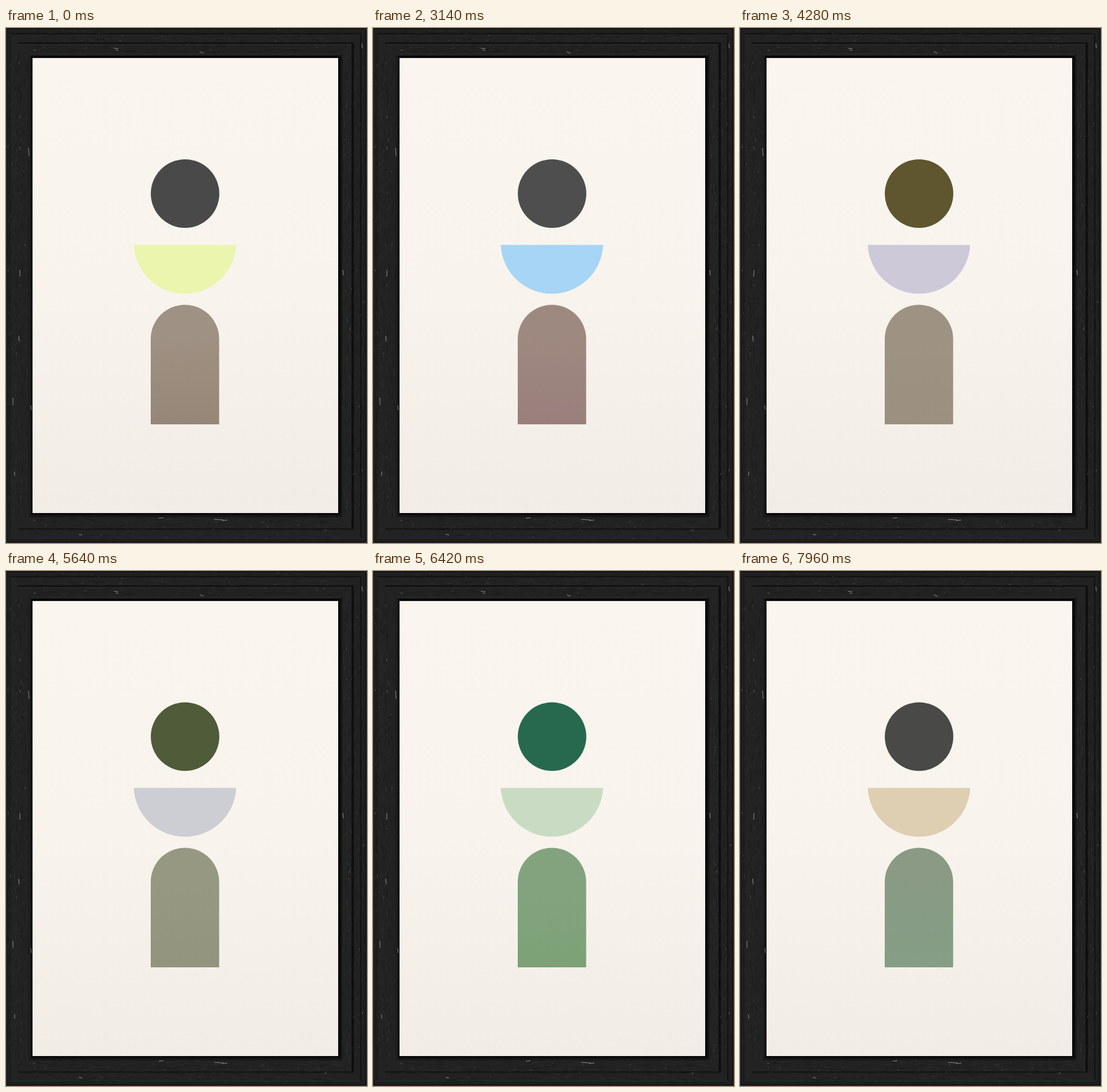
Write an HTML page that moves like this. It is 626x894 px and loops after 8 s.

```html
<!DOCTYPE html>
<html lang="en">
<head>
<meta charset="utf-8">
<title>Framed shapes</title>
<style>
  html, body { margin: 0; width: 100%; height: 100%; overflow: hidden; background: #555; }
  svg { display: block; width: 100vw; height: 100vh; }
</style>
</head>
<body>
<svg id="stage" viewBox="0 0 626 894">
  <defs>
    <linearGradient id="paper" x1="0" y1="0" x2="0" y2="1">
      <stop offset="0" stop-color="#faf6ef"/>
      <stop offset=".5" stop-color="#f8f4ed"/>
      <stop offset="1" stop-color="#f1ece6"/>
    </linearGradient>
    <linearGradient id="archFill" x1="0" y1="0" x2="0" y2="1">
      <stop id="archTop" offset=".25"/>
      <stop id="archBottom" offset="1"/>
    </linearGradient>
  </defs>
  <g id="frame"></g>
  <rect x="46" y="52" width="530" height="790" fill="url(#paper)"/>
  <path d="M46 52.5H576" stroke="#c9c5bf" opacity=".6"/>
  <circle id="disc" cx="310.5" cy="287.5" r="59.4"/>
  <path id="bowl" d="M221.4 376.5H399.2A89 89 0 0 1 221.4 376.5Z"/>
  <path d="M251 688V539.8A59.3 59.3 0 0 1 369.6 539.8V688Z" fill="url(#archFill)"/>
</svg>
<script>
const W = 626, H = 894;
const byId = id => document.getElementById(id);
const frame = byId('frame');

function add(tag, attrs) {
  const node = document.createElementNS('http://www.w3.org/2000/svg', tag);
  for (const key in attrs) node.setAttribute(key, attrs[key]);
  frame.append(node);
}

let seed = 7;
function random() {
  seed = (seed * 16807) % 2147483647;
  return seed / 2147483647;
}
const between = (a, b) => a + (b - a) * random();

// Insets of each moulding edge: top, right, bottom, left
const edges = [
  [0, .5, .5, .5], [2, 4, 3, 2], [9, 10, 8, 7], [11, 12, 10, 9], [25, 23, 23, 20],
  [28, 27, 26, 22], [30, 29, 28, 24], [43, 43, 45, 39], [48, 46, 49, 43], [52, 50, 52, 46]
];
// Grey levels of each moulding: top, right, bottom, left
const greys = [
  [20, 24, 22, 28], [32, 32, 30, 30], [18, 20, 38, 32], [34, 33, 34, 35], [18, 15, 22, 34],
  [42, 38, 36, 36], [33, 35, 34, 34], [36, 22, 22, 30], [8, 8, 9, 13]
];

const corners = ([t, r, b, l]) => [[l, t], [W - r, t], [W - r, H - b], [l, H - b]];

greys.forEach((levels, i) => {
  const outer = corners(edges[i]), inner = corners(edges[i + 1]);
  levels.forEach((v, side) => {
    const next = (side + 1) % 4;
    const fill = `rgb(${v},${v},${v})`;
    add('polygon', {
      points: [outer[side], outer[next], inner[next], inner[side]].join(' '),
      fill, stroke: fill, 'stroke-width': .3
    });
  });
});

// Fine strokes following the wood on all four sides
function grain(count, maxLength, stroke, width, opacity) {
  let d = '';
  for (let i = 0; i < count; i++) {
    const length = between(1, maxLength);
    const pick = random();
    const far = random() < .5;
    if (pick < .62) {
      const x = far ? between(584, 622) : between(3, 40);
      d += `M${x.toFixed(1)} ${between(45, 840).toFixed(1)}l${between(-.5, .5).toFixed(1)} ${length.toFixed(1)}`;
    } else {
      const y = far ? between(849, 889) : between(3, 43);
      d += `M${between(40, 575).toFixed(1)} ${y.toFixed(1)}l${length.toFixed(1)} ${between(-.5, .5).toFixed(1)}`;
    }
  }
  add('path', { d, stroke, 'stroke-width': width, opacity, fill: 'none' });
}
grain(900, 16, '#000', .7, .25);
grain(900, 10, '#666', .6, .22);
grain(90, 5, '#bbb', .6, .35);
grain(20, 5, '#eee', .6, .5);

// The larger chips in the paint
add('path', {
  d: 'M187 35l8 1M190 38l5 1M336 41l6 3M39 208l1 14M24 420v11M22 534l1 10M12 642v13' +
     'M265 851l8 -1M361 853l16 1M375 855l9 -1M126 879l6 1M617 27l1 8M584 420l1 9M43 655l1 8M15 770v7',
  stroke: '#ccc', 'stroke-width': .9, opacity: .7, fill: 'none'
});

// Colours: disc, bowl, top of arch, bottom of arch
const palettes = [
  ['#494949', '#ebf5ae', '#9f9183', '#968677'],
  ['#4e4e4e', '#a7d5f5', '#9e8980', '#997f7c'],
  ['#5f5630', '#cdc9d9', '#9e9383', '#9b8f80'],
  ['#27694f', '#c9dcc3', '#83a37f', '#7ca276'],
  ['#6b2941', '#f3c0a1', '#919089', '#8c9a92']
].map(set => set.map(hex => [1, 3, 5].map(i => parseInt(hex.slice(i, i + 2), 16))));

const LOOP = 8000, CYCLE = 2140, HOLD = 1000, STEP = 60, STEPS = 20;
const smooth = p => p * p * (3 - 2 * p);
const mix = (a, b, p) => `rgb(${a.map((v, i) => Math.round(v + (b[i] - v) * p))})`;

function render(time) {
  const t = time % LOOP;
  const index = Math.floor(t / CYCLE);
  const moving = t % CYCLE - HOLD;
  const step = moving < 0 ? 0 : Math.floor(moving / STEP) + 1;
  const p = smooth(Math.min(step / STEPS, 1));
  const [disc, bowl, top, bottom] =
    palettes[index].map((color, i) => mix(color, palettes[index + 1][i], p));
  byId('disc').setAttribute('fill', disc);
  byId('bowl').setAttribute('fill', bowl);
  byId('archTop').setAttribute('stop-color', top);
  byId('archBottom').setAttribute('stop-color', bottom);
}

const start = performance.now();
function tick() {
  render(performance.now() - start);
  requestAnimationFrame(tick);
}
tick();
</script>
</body>
</html>
```
